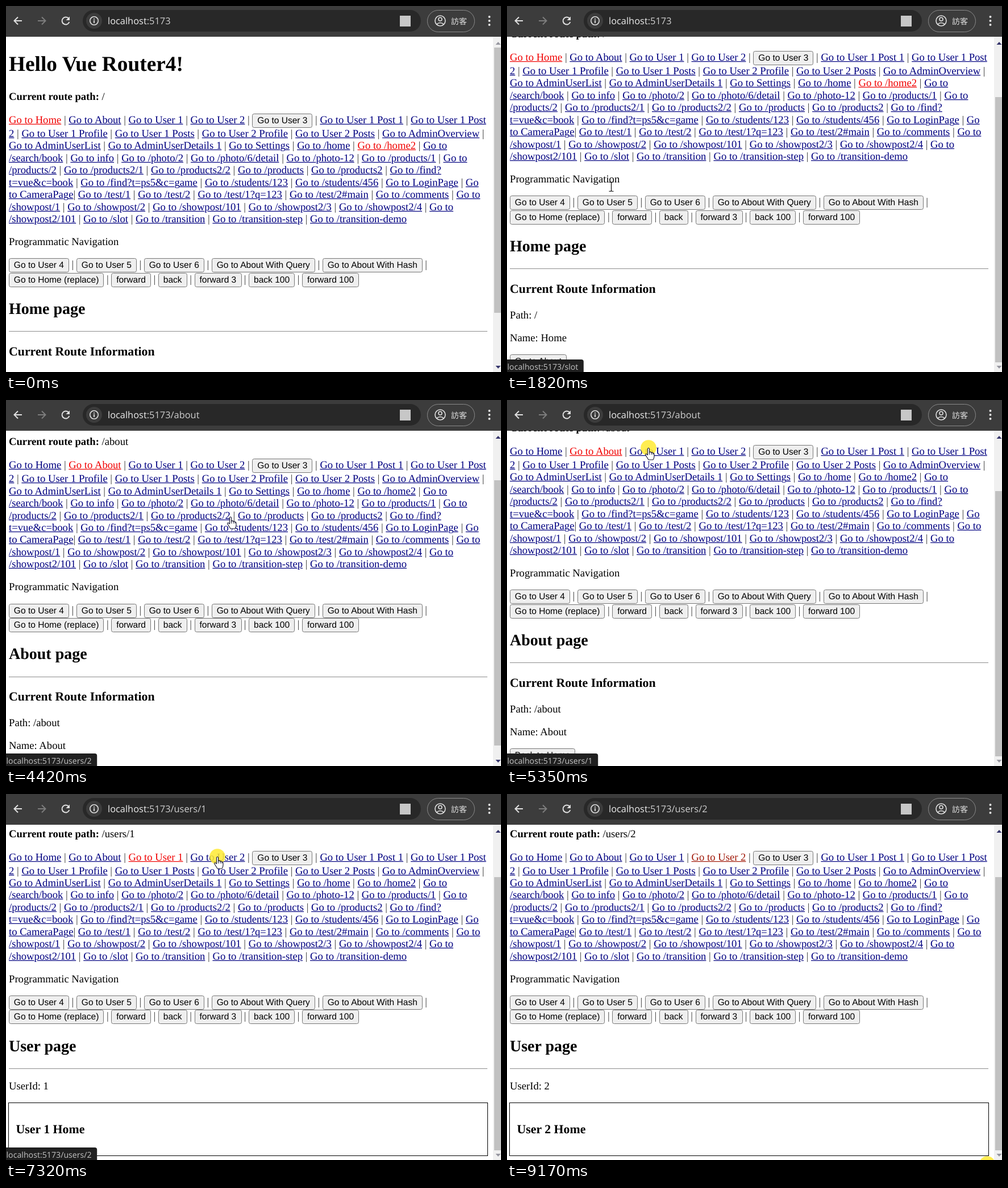
Animation of 871 by 643 pixels, one loop 9240 ms. Source, as an HTML page with a canvas:

```html
<!DOCTYPE html>
<html lang="en">
<head>
<meta charset="utf-8">
<title>Router demo</title>
<style>
html, body { margin: 0; width: 100%; height: 100%; overflow: hidden; background: #fff; }
canvas { display: block; }
</style>
</head>
<body>
<canvas id="stage" width="871" height="643"></canvas>
<script>
const ctx = document.getElementById('stage').getContext('2d');
const W = 871, H = 643, TOP = 54, LOOP = 9240, LEFT = 5;
const SERIF = '"Liberation Serif", "Times New Roman", serif';
const SANS = '"Liberation Sans", Arial, sans-serif';
const UI = '"Open Sans", "Noto Sans", sans-serif';
const EM = 18.66;
const BODY = `${EM}px ${SERIF}`;
const BUTTON = `15.55px ${SANS}`;
const bold = size => `bold ${size}px ${SERIF}`;

// Bars separate the links, brackets mark buttons.
const NAV = [
  'Go to Home | Go to About | Go to User 1 | Go to User 2 | [Go to User 3] | Go to User 1 Post 1 | Go to User 1 Post',
  '2 | Go to User 1 Profile | Go to User 1 Posts | Go to User 2 Profile | Go to User 2 Posts | Go to AdminOverview |',
  'Go to AdminUserList | Go to AdminUserDetails 1 | Go to Settings | Go to /home | Go to /home2 | Go to',
  '/search/book | Go to info | Go to /photo/2 | Go to /photo/6/detail | Go to /photo-12 | Go to /products/1 | Go to',
  '/products/2 | Go to /products2/1 | Go to /products2/2 | Go to /products | Go to /products2 | Go to /find?',
  't=vue&c=book | Go to /find?t=ps5&c=game | Go to /students/123 | Go to /students/456 | Go to LoginPage | Go',
  'to CameraPage| Go to /test/1 | Go to /test/2 | Go to /test/1?q=123 | Go to /test/2#main | Go to /comments | Go to',
  '/showpost/1 | Go to /showpost/2 | Go to /showpost/101 | Go to /showpost2/3 | Go to /showpost2/4 | Go to',
  '/showpost2/101 | Go to /slot | Go to /transition | Go to /transition-step | Go to /transition-demo'
];
const ACTIONS = [
  '[Go to User 4] | [Go to User 5] | [Go to User 6] | [Go to About With Query] | [Go to About With Hash] |',
  '[Go to Home (replace)] | [forward] | [back] | [forward 3] | [back 100] | [forward 100]'
];

const ROUTES = [
  { at: 0, path: '/', name: 'Home', other: 'Go to About', active: ['Go to Home', 'Go to /home2'], wheel: 1610, max: 110 },
  { at: 3410, path: '/about', name: 'About', other: 'Back to Home', active: ['Go to About'], wheel: 4350, max: 110 },
  { at: 5480, path: '/users/1', user: 1, active: ['Go to User 1'], wheel: 6500, max: 89.5 },
  { at: 7450, path: '/users/2', user: 2, active: ['Go to User 2'], wheel: 8000, max: 89.5 }
];
const WHEEL_STEPS = [0.363, 0.78, 0.96, 1];

const STATUS = [
  [0, ''], [1400, '/find?t=ps5&c=game'], [1680, '/slot'], [2030, ''], [2500, '/users/1/profile'],
  [3070, '/about'], [3680, ''], [3750, '/users/2'], [5080, '/users/1'], [5810, ''],
  [5950, '/users/2/profile'], [6710, '/users/2'], [7650, '']
];
const POINTER = [
  [0, 'none'], [190, 'arrow'], [1000, 'beam'], [1400, 'hand'], [1820, 'beam'], [2400, 'hand'],
  [3410, 'beam'], [3750, 'hand'], [5480, 'beam'], [5950, 'hand'], [7450, 'arrow']
];
const PATH = [
  [190, 752, 600], [500, 500, 540], [750, 180, 535], [1090, 108, 165], [1160, 108, 165],
  [1400, 183, 317], [2100, 183, 317], [2730, 150, 113], [2930, 150, 113], [3140, 158, 86],
  [3680, 158, 86], [3820, 395, 205], [4890, 395, 205], [5150, 249, 84], [5810, 249, 84],
  [6020, 383, 224], [6220, 383, 224], [6500, 391, 221], [6570, 391, 221], [6920, 372, 110],
  [7650, 372, 110], [7980, 804, 493], [8420, 804, 493], [8770, 845, 650]
];
const CLICKS = [[3280, 3410], [5350, 5480], [7320, 7450], [9170, LOOP]];

const HAND = new Path2D('M-1.5 1.5Q0 -1 1.5 1.5V8Q4 6 5 8.5Q7 7.5 8 9.5Q10 9 10 11V15Q10 18 8 21H0L-5 13Q-6 10 -3.5 11L-1.5 12.5Z');
const ARROW = new Path2D('M0 0V15L3.5 12L6 17.5L8.5 16.5L6 11H10.5Z');
const BEAM = new Path2D('M-4 -8H-1L0 -7L1 -8H4M0 -7V7M-4 8H-1L0 7L1 8H4');

// Parts of a letter, in em, where the underline makes room for its tail.
const TAILS = { p: [0, 0.28], g: [0, 0.48], q: [0.26, 0.5] };

const lastAt = (list, t) => list.filter(item => item[0] <= t).pop()[1];

function text(str, x, y, font, color = '#000') {
  ctx.font = font;
  ctx.fillStyle = color;
  ctx.fillText(str, x, y);
  return ctx.measureText(str).width;
}

function rect(x, y, w, h, color) {
  ctx.fillStyle = color;
  ctx.fillRect(x, y, w, h);
}

function pill(x, y, w, h, r, fill, line) {
  ctx.beginPath();
  ctx.roundRect(x, y, w, h, r);
  if (fill) { ctx.fillStyle = fill; ctx.fill(); }
  if (line) { ctx.strokeStyle = line; ctx.lineWidth = 1; ctx.stroke(); }
}

function circle(x, y, r, fill, line, width = 1.6) {
  ctx.beginPath();
  ctx.arc(x, y, r, 0, Math.PI * 2);
  if (fill) { ctx.fillStyle = fill; ctx.fill(); }
  if (line) { ctx.strokeStyle = line; ctx.lineWidth = width; ctx.stroke(); }
}

function strokes(d, color, width = 2) {
  ctx.strokeStyle = color;
  ctx.lineWidth = width;
  ctx.stroke(new Path2D(d));
}

function link(str, x, y, color) {
  const w = text(str, x, y, BODY, color);
  const lineY = Math.round(y) + 1;
  let from = x;
  [...str].forEach((ch, i) => {
    const tail = TAILS[ch];
    if (!tail) return;
    const left = x + ctx.measureText(str.slice(0, i)).width;
    const to = left + tail[0] * EM;
    if (to > from) rect(from, lineY, to - from, 1.2, color);
    from = left + tail[1] * EM;
  });
  if (x + w > from) rect(from, lineY, x + w - from, 1.2, color);
  return w;
}

function button(str, x, y) {
  const pad = 8.87;
  ctx.font = BUTTON;
  const w = ctx.measureText(str).width + pad * 2;
  pill(Math.round(x) + 0.5, Math.round(y - 17) + 0.5, Math.round(w) - 1, 24, 3, '#efefef', '#767676');
  text(str, x + pad, y, BUTTON);
  return w;
}

function row(line, y, active, red) {
  let x = LEFT;
  for (const part of line.split(/( ?\| ?)/)) {
    if (!part) continue;
    if (part.includes('|')) x += text(part, x, y, BODY, '#333');
    else if (part[0] === '[') x += button(part.slice(1, -1), x, y);
    else x += link(part, x, y, active.includes(part) ? red : '#000080');
  }
}

function drawPage(route, scroll, red) {
  const y = v => v - scroll;
  text('Hello Vue Router4!', LEFT, y(114), bold(37.33));
  const w = text('Current route path:', LEFT, y(165), bold(EM));
  text(' ' + route.path, LEFT + w, y(165), BODY);
  NAV.forEach((line, i) => row(line, y(i ? 230 + (i - 1) * 21.45 : 206), route.active, red));
  text('Programmatic Navigation', LEFT, y(420), BODY);
  ACTIONS.forEach((line, i) => row(line, y(460.4 + i * 25.4), [], red));
  text((route.name || 'User') + ' page', LEFT, y(541), bold(28));
  rect(LEFT, Math.round(y(571.4)), 842, 1, '#8c8c8c');
  if (route.user) {
    text('UserId: ' + route.user, LEFT, y(608.5), BODY);
    ctx.strokeStyle = '#000';
    ctx.lineWidth = 1;
    ctx.strokeRect(LEFT - 0.5, Math.round(y(631.8)) + 0.5, 843, 93);
    text(`User ${route.user} Home`, 17.5, y(685.5), bold(21.84));
  } else {
    text('Current Route Information', LEFT, y(614), bold(21.84));
    text('Path: ' + route.path, LEFT, y(659), BODY);
    text('Name: ' + route.name, LEFT, y(699), BODY);
    button(route.other, LEFT, y(739));
  }
}

function triangle(y, dir, on) {
  ctx.fillStyle = on ? '#35356c' : '#96969f';
  ctx.fill(new Path2D(`M861.5 ${y + 2 * dir}H870.5L866 ${y - 3 * dir}Z`));
}

function drawScrollbar(scroll, max) {
  rect(857, TOP, 14, H - TOP, '#f0f0f0');
  const room = 553, size = max > 100 ? 466 : 480;
  rect(859, Math.round(73 + (room - size) * scroll / max), 12, size, '#c1c1c1');
  triangle(66, 1, scroll > 0);
  triangle(634, -1, scroll < max);
}

function drawStatus(path) {
  if (!path) return;
  const str = 'localhost:5173' + path, font = `14.2px ${UI}`;
  ctx.font = font;
  pill(-5, 621, ctx.measureText(str).width + 15, 30, 4, '#202020');
  text(str, 0.5, 639, font, '#c4c4c4');
}

function drawToolbar(path) {
  const light = '#e0e0e0';
  rect(0, 0, W, TOP, '#3c3c3c');
  strokes('M28 26H15M21 19.5L14.5 26L21 32.5', light);
  strokes('M56 26H69M63 19.5L69.5 26L63 32.5', '#7d7d7d');
  strokes('M110.2 22A6.5 6.5 0 1 0 111.3 28', light);
  ctx.fillStyle = light;
  ctx.fill(new Path2D('M112 18.5V25H105.5Z'));

  pill(135, 7, 595, 38, 19, '#282828');
  circle(155, 26, 14, '#3c3c3c');
  circle(155, 26, 7.2, null, light);
  rect(154.1, 25, 1.8, 5, light);
  rect(154.1, 22, 1.8, 1.8, light);
  const font = `16.4px ${UI}`;
  const w = text('localhost', 179, 32, font, '#ececec');
  text(':5173' + (path === '/' ? '' : path), 179 + w, 32, font, '#cfcfcf');
  rect(693, 17, 19, 19, '#c7c7c7');

  pill(741.5, 7.5, 83, 38, 19, null, '#8a8a8a');
  circle(764, 26, 9, null, light);
  circle(764, 23.3, 3, null, light);
  strokes('M757.8 32.2Q764 26.8 770.2 32.2', light, 1.6);
  text('訪客', 783, 32, '14px "Noto Sans CJK TC", "Noto Sans CJK", sans-serif', light);
  for (const y of [19, 26, 33]) circle(850.5, y, 2, light);
}

function pointerAt(t) {
  const i = PATH.findIndex(key => key[0] > t);
  if (i === 0) return PATH[0].slice(1);
  if (i < 0) return PATH[PATH.length - 1].slice(1);
  const [t0, x0, y0] = PATH[i - 1], [t1, x1, y1] = PATH[i];
  const p = (t - t0) / (t1 - t0), e = p * p * (3 - 2 * p);
  return [x0 + (x1 - x0) * e, y0 + (y1 - y0) * e];
}

function drawPointer(t) {
  const [x, y] = pointerAt(t);
  if (CLICKS.some(([a, b]) => t >= a && t < b)) circle(x, y, 13.8, 'rgba(255, 234, 50, 0.85)');
  const kind = lastAt(POINTER, t);
  if (kind === 'none') return;
  ctx.save();
  ctx.translate(Math.round(x), Math.round(y));
  ctx.lineWidth = 1.1;
  if (kind === 'beam') {
    ctx.translate(0.5, 0.5);
    ctx.strokeStyle = '#000';
    ctx.stroke(BEAM);
  } else {
    const shape = kind === 'hand' ? HAND : ARROW;
    ctx.fillStyle = '#fff';
    ctx.fill(shape);
    ctx.strokeStyle = '#10102c';
    ctx.stroke(shape);
    if (kind === 'hand') strokes('M1.5 8V12M5 8.5V12M8 9.5V12', '#10102c', 1);
  }
  ctx.restore();
}

function scrollAt(route, t) {
  if (t < route.wheel) return 0;
  const step = Math.floor((t - route.wheel) / 70);
  return route.max * WHEEL_STEPS[Math.min(step, WHEEL_STEPS.length - 1)];
}

function draw(t) {
  const route = ROUTES.filter(r => r.at <= t).pop();
  const scroll = scrollAt(route, t);
  ctx.textRendering = 'geometricPrecision';
  rect(0, 0, W, H, '#fff');
  drawPage(route, scroll, t >= 8210 ? '#a01808' : '#f00000');
  drawScrollbar(scroll, route.max);
  drawStatus(lastAt(STATUS, t));
  drawToolbar(route.path);
  drawPointer(t);
}

const start = performance.now();
function tick() {
  draw((performance.now() - start) % LOOP);
  requestAnimationFrame(tick);
}
tick();
</script>
</body>
</html>
```
